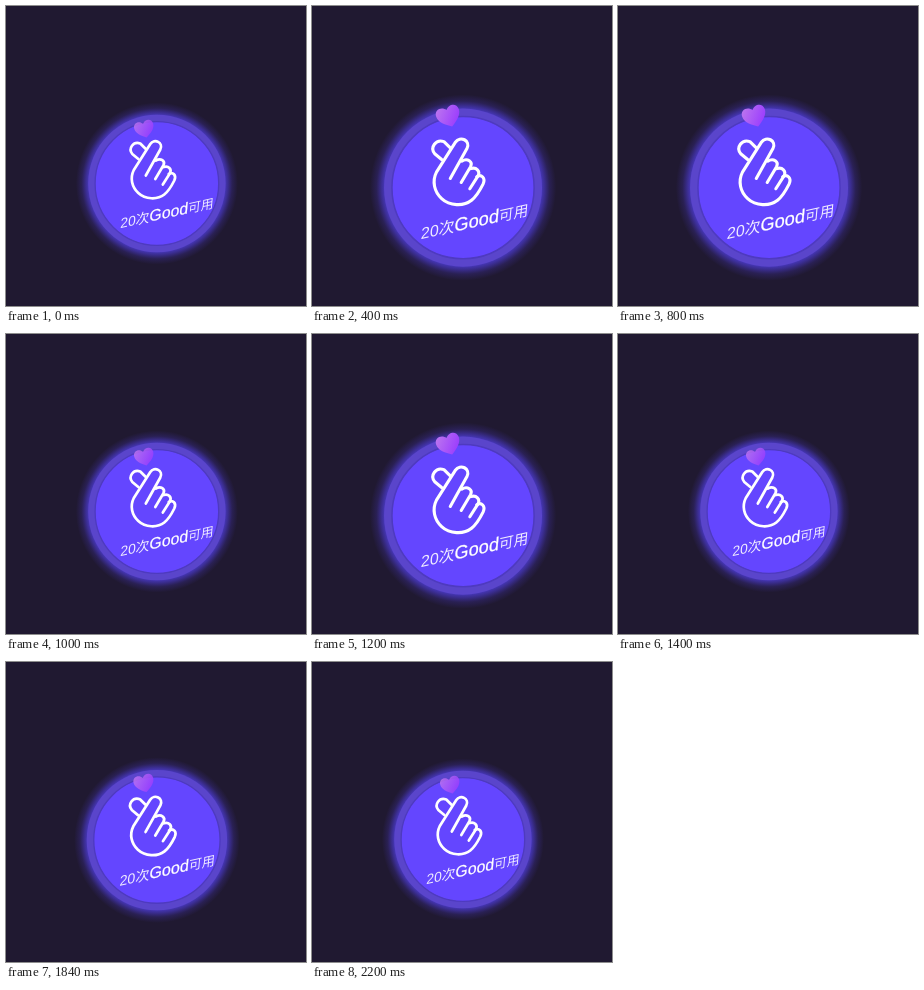
Recreate the animation shown at these times as an HTML page. Size 300 px wide and 300 px high, loop 2.76 s.

```html
<!DOCTYPE html>
<html lang="zh">
<head>
<meta charset="utf-8">
<style>
html, body { margin: 0; width: 100%; height: 100%; overflow: hidden; background: #201931; }
svg { display: block; width: 100vw; height: 100vh; }
text { font-family: "Liberation Sans", "Noto Sans CJK SC", "Noto Sans CJK", sans-serif; font-weight: 300; }
</style>
</head>
<body>
<svg viewBox="0 0 300 300">
  <defs>
    <radialGradient id="glow">
      <stop offset=".83" stop-color="#5240e0" stop-opacity=".85"/>
      <stop offset=".88" stop-color="#4f3dda" stop-opacity=".55"/>
      <stop offset=".93" stop-color="#4c3ad0" stop-opacity=".22"/>
      <stop offset="1" stop-color="#4c3ad0" stop-opacity="0"/>
    </radialGradient>
    <linearGradient id="pink" x1="0" y1="0" x2="1" y2=".7">
      <stop stop-color="#be78ee"/>
      <stop offset="1" stop-color="#9838ff"/>
    </linearGradient>
  </defs>
  <g id="badge">
    <circle cx="150.9" cy="177.5" r="81" fill="url(#glow)"/>
    <circle cx="150.9" cy="177.5" r="68.7" fill="#5a45cb"/>
    <circle cx="150.9" cy="177.5" r="61.8" fill="#6446ff" stroke="#4e3abf" stroke-width="1.3"/>
    <g transform="translate(.3 0)" fill="none" stroke="#fff" stroke-width="2.7" stroke-linecap="round" stroke-linejoin="round">
      <path d="M132 153L126 148C121.500 142.500 127 135 134 137.500L139.500 143"/>
      <path d="M139.500 169.500L154 143.500C157.500 136.500 148 132 144 138L127.500 164C123.500 172 125.500 181 132 187C139 193.500 151 194 158 188.500C162.500 185 165.500 179.500 168 174.500C170.500 169 166.500 165.500 162.500 168"/>
      <path d="M149.500 154.500C154.500 151.500 159.500 155 157 159.500L149 173M157.500 161C162 159.500 166 163 163.500 167.500L156.500 178.500"/>
    </g>
    <text transform="translate(114 222.300) skewY(-12.500) skewX(-5)" fill="#efebff" font-size="13.800">20次<tspan font-size="15.800" fill="#fff" stroke="#fff" stroke-width=".25">Good</tspan><tspan font-size="12.800">可用</tspan></text>
    <path id="heart" d="M0 9C-5 6-10 2-10-3C-10-9-3-10 0-5.500C3-10 10-9 10-3C10 2 5 6 0 9Z" fill="url(#pink)"/>
  </g>
</svg>
<script>
const LOOP = 2760, STEP = 40, START = 200, END = 2200, HALF = 200;
const badge = document.getElementById('badge');
const heart = document.getElementById('heart');

// 0 at rest, 1 at the top of each pulse
function pulse(t) {
  if (t < START || t > END) return 0;
  const u = (t - START) / HALF % 2;
  const linear = u < 1 ? u : 2 - u;
  return (linear + (1 - Math.cos(Math.PI * linear)) / 2) / 2;
}

function draw() {
  const t = Math.floor(performance.now() % LOOP / STEP) * STEP;
  const p = pulse(t);
  badge.setAttribute('transform', `translate(150 150) scale(${1 + .15 * p}) translate(-150 -150)`);
  heart.setAttribute('transform', `translate(138.4 ${123 - 7.5 * p}) rotate(${-14 - 5 * p}) scale(${.98 + .06 * p})`);
  heart.setAttribute('opacity', .85 + .15 * p);
  requestAnimationFrame(draw);
}
draw();
</script>
</body>
</html>
```
